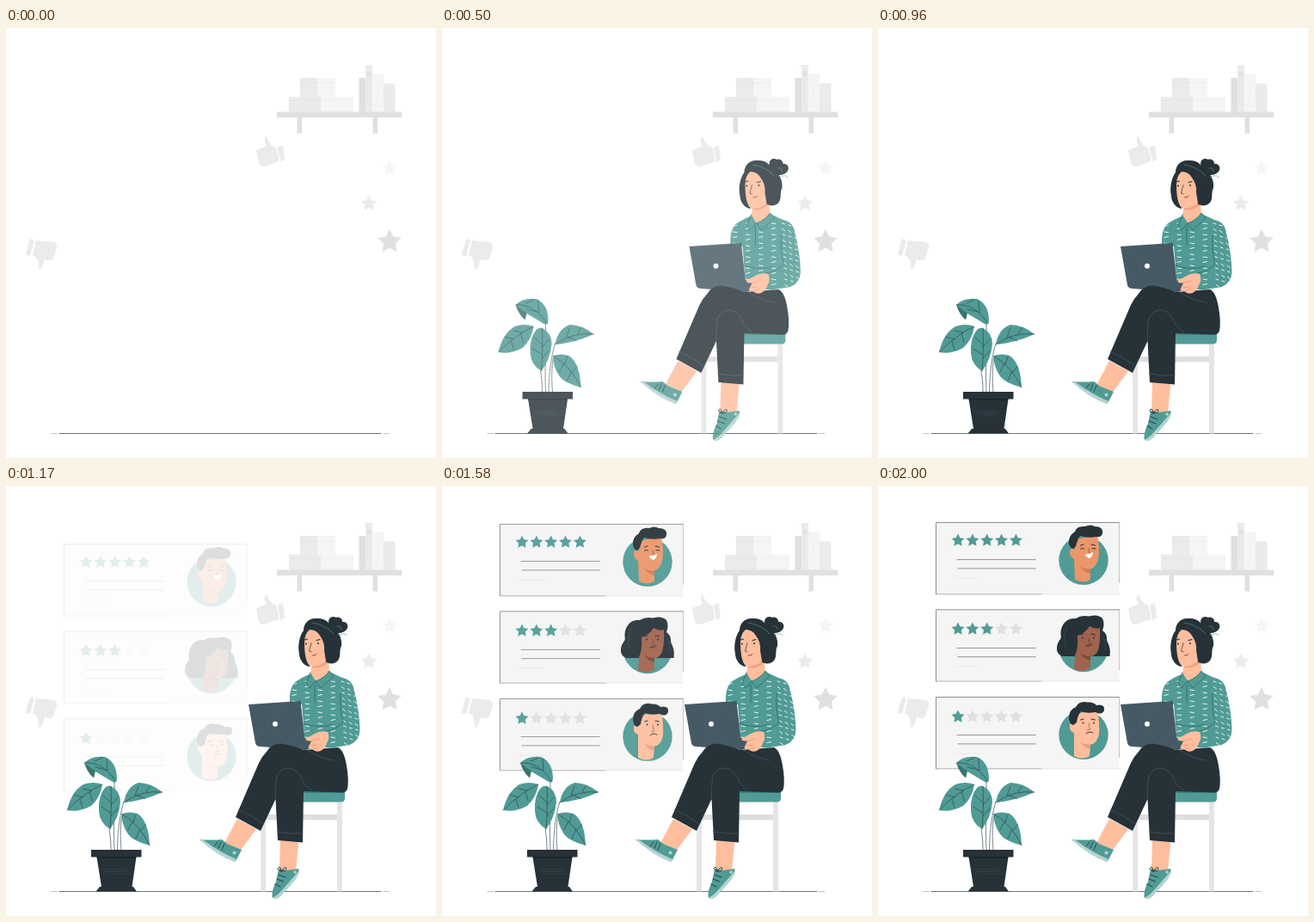
These frames come from a looping animation (500x500 px, 2040 ms). An HTML page:

```html
<!DOCTYPE html>
<html>
<head>
<meta charset="utf-8">
<style>
html, body { margin: 0; width: 100%; height: 100%; overflow: hidden; background: #fff }
svg { display: block; width: 100vmin; height: 100vmin }
</style>
</head>
<body>
<svg id="stage" viewBox="0 0 500 500"></svg>
<script>
const TEAL = '#509b95', DARK = '#263238', SLATE = '#455a64', SKIN = '#ffbe9d';
const G1 = '#e0e0e0', G2 = '#ebebeb', G3 = '#f5f5f5', PALE = '#b4d4d1';

const fill = (d, c) => `<path d="${d}" fill="${c}"/>`;
const line = (d, c = DARK, w = .7, extra = '') =>
  `<path d="${d}" fill="none" stroke="${c}" stroke-width="${w}" stroke-linecap="round" stroke-linejoin="round" ${extra}/>`;
const rect = (x, y, w, h, c) => `<rect x="${x}" y="${y}" width="${w}" height="${h}" fill="${c}"/>`;
const dot = (x, y, r, c) => `<circle cx="${x}" cy="${y}" r="${r}" fill="${c}"/>`;
const star = (x, y, r, c) => {
  let points = '';
  for (let i = 0; i < 10; i++) {
    const a = Math.PI * (i / 5 - .5), k = i % 2 ? r / 2 : r;
    points += `${(x + k * Math.cos(a)).toFixed(2)},${(y + k * Math.sin(a)).toFixed(2)} `;
  }
  return `<polygon points="${points}" fill="${c}"/>`;
};

function backdrop() {
  return rect(342, 58, 20, 22, G2) + rect(362, 58, 21, 22, G3) +
    rect(329, 80, 37, 18, G2) + rect(366, 80, 38, 18, G3) +
    line('M342 64H362M329 84H366', G1, .6) + line('M362 64H383M366 84H404', G2, .8) +
    rect(410.5, 58, 7.5, 40, G1) + rect(418, 43, 8, 55, G2) + rect(420, 50.5, 4.3, 5.5, G1) +
    rect(426, 53, 13, 45, G3) + rect(439, 64.5, 13.5, 33.5, G2) +
    line('M432.5 65V81M426 90H439', G2, .7) + line('M421 58V90', G1, .6) +
    rect(315, 97.5, 145, 6.5, G1) + rect(338.5, 104, 5.5, 18.5, G1) + rect(426.5, 104, 5.5, 18.5, G1) +
    fill('M291 142L303 137.5C300 132 300 128 303 126C305 132 308 136 312 138L315 139.5L317.5 155L300 161Q296 161 294 158ZM316 138.5L322 136L324 153L319 156Z', G2) +
    fill('M28 245L33 247L28 265L22.5 264ZM35 247L56 249Q60 252 59 256L55 268Q54 270.5 50 270L44 269Q44 276 40 281Q38 282 38 279Q38 270 34.5 266L31 265Z', G2) +
    star(446, 162.8, 9.2, G3) + star(422, 204.2, 9.5, G2) + star(446, 248.4, 14.5, G1) +
    line('M62 471.5H436', '#5f686c', .9) + line('M53 471.5H59M439 471.5H445', '#b0b4b6', .8);
}

function card(y, starY, count, lineY, face) {
  let s = rect(67.5, y, 213, 83.3, G3) +
    line(`M67.5 ${y + 83.3}V${y}H280.5`, '#70787b', .8) + line(`M280.5 ${y}V${y + 70}`, '#a9aeb0', .7) +
    line(`M67.5 ${y + 83.3}H190`, '#8d9295', .7) + line(`M190 ${y + 83.3}H280`, '#d5d7d8', .6);
  for (let i = 0; i < 5; i++) s += star(93 + i * 16.85, starY, 7.9, i < count ? TEAL : G1);
  return s + line(`M92 ${lineY}H183M93 ${lineY + 10.3}H183`, '#858b8e', .9) +
    line(`M90 ${lineY + 21.5}H118`, '#dcdedf', .6) + dot(239, y + 43.7, 28.7, TEAL) + face;
}

function features(y) {
  return line(`M235.5 ${y - 4}L239 ${y - 5}M248 ${y - 5}L252.5 ${y - 4}`, DARK, 1) +
    line(`M245 ${y}L246.5 ${y + 7}L243.5 ${y + 8}`, DARK, .5);
}

function cards() {
  const cheerful =
    fill('M229 62L255 57Q258 72 256.5 83Q254 95 247 96.5L247 109Q239 113.5 229 109L228 85Q222 82 223 75Q225 71 229 74Z', '#eb966a') +
    fill('M247 96.5Q240 97 235 93Q240 101 247 102Z', '#d17b50') +
    fill('M222 67Q221 58 229 53Q231 46 241 47Q247 44 252 47Q262 47 261 55Q260 60 254 59Q244 61 235 58Q232 62 230 70L227 73Q223 72 222 67Z', DARK) +
    features(73) + line('M235.5 73Q237.5 71.5 239.5 73M249 73Q251 71.5 253 73', DARK, 1) +
    fill('M240.5 79.5Q246 79 250 77Q249.5 83 245 84Q242 83 240.5 79.5Z', '#fff');
  const neutral =
    fill('M214 198Q207 195 208 187Q209 181 213 177Q211 167 216 160Q221 153 230 154Q236 150 245 151.5Q256 148.5 261 154Q264 160 261 168Q267 172 266 180Q271 188 269.5 198Z', DARK) +
    fill('M232 174Q241 171 246 163Q252 167 258 165Q259 185 255 193Q251 198.5 247 198L247 212Q238 217 228 213L229 197Q233 190 232 174Z', '#a0634d') +
    fill('M247 198Q240 198 235 194Q240 202 247 203Z', '#7e4938') +
    features(177) + dot(238, 176.5, 1, DARK) + dot(251, 176.5, 1, DARK) +
    line('M242 186Q246 187 249 184', DARK, .9) + line('M220 163Q215 174 218 187M262 175Q266 184 264 191', SLATE, .5);
  const unhappy =
    fill('M229 265L255 260Q258 276 257 288Q255 300 247 300.5L246 314Q238 319 228 314L228 287Q222 285 223 278Q225 274 229 277Z', SKIN) +
    fill('M247 300.5Q240 301 235 297Q240 305 247 305.5Z', '#eb9c7c') +
    fill('M222 270Q222 260 230 257Q234 249 244 251.5Q251 251 254 255Q264 253 263 261Q260 267 253 263Q242 265 236 262Q232 267 231 275L227 278Q223 277 222 270Z', DARK) +
    features(276) + dot(238.5, 275.5, 1, DARK) + dot(251, 275.5, 1, DARK) +
    line('M242 288Q246 284.5 250 287', DARK, .9);
  return card(42.5, 63.4, 5, 85.6, cheerful) + card(143.8, 166.4, 3, 188.4, neutral) +
    card(245.5, 268.3, 1, 289.6, unhappy);
}

function plant() {
  const leaves = [
    'M91 322Q100 313 115 315Q129 321 129 341Q128 346 124 344Q114 338 104 332Z',
    'M112 347Q102 343 90 347Q76 355 71 377Q84 380 99 372Q110 362 112 347Z',
    'M122 349Q133 354 133 368Q131 386 121 399Q109 392 108 378Q107 360 115 351Q118 348 122 349Z',
    'M137 368Q140 350 154 345Q168 345 182 356Q160 366 137 368Z',
    'M134.5 381Q144 378 153 381Q166 390 167 418Q148 413 142 405Q134 393 134.5 381Z'
  ];
  const veins = 'M91 322Q113 320 128 344M103 320L112 316M116 330L104 327M118 331L117 317' +
    'M112 347Q92 356 71 377M99 354L89 352M89 362L79 359M97 355L100 366M86 364L89 374' +
    'M122 349Q123 376 121 399M122 368L113 360M122 380L111 373M122 371L130 362M122 384L130 375' +
    'M137 368Q158 353 182 356M150 360L154 349M163 356L167 349M152 359L162 364' +
    'M135 381.5Q156 394 167 418M148 391L151 382M157 400L163 393M147 390L142 400M156 399L151 410';
  return line('M122 423Q122 410 120 399M126 423Q125 400 126 380V344M129.5 423Q130 390 137 367M134 423Q132 400 135 382', SLATE, .8, 'stroke-dasharray="3 1"') +
    leaves.map(d => fill(d, TEAL)).join('') + fill('M91 322L104 331.5L102 339.5Q95 334 91 322Z', '#37726d') +
    line(veins, DARK, .55) +
    fill('M99 423H157.5V431.5H151.5L146.5 466H148L152 471.5H104.5L109 466H111L105.5 431.5H99Z', DARK) +
    line('M106 432H151', '#111b20', 1) + line('M112 446H141M114 448.5H139M118 451H144', SLATE, .4);
}

function dashes() {
  let marks = '';
  for (let i = 0; i < 13; i++) {
    const y = 224 + i * 6.5;
    for (let j = 0; j < 4; j++) marks += `M${333 + j * 15} ${y + j % 2 * 3}l4.5 ${i % 2 ? -1 : .7}`;
    for (let j = 0; j < 3; j++) marks += `M${390 + j * 7 + i * .3} ${y + 3 + j * 2}l3 ${i % 2 ? 2.2 : 1}`;
  }
  return `<g clip-path="url(#shirt)">${line(marks, '#e8f3f1', 1)}</g>`;
}

function woman() {
  const shirt = 'M353 219Q341 224 335 229Q329 237 330 252L344 254L348 302L378 304.5L400 301Q411 296 411.5 284Q411 262 405 238Q403 225 391 223L376 216Z';
  const chair = rect(296, 383, 6, 88.5, '#e5e5e5') + rect(385, 366, 6, 105.5, '#e5e5e5') +
    rect(302, 382, 83, 6.3, '#dedede') +
    fill('M335 354H394V363Q394 367.5 389 367.5H335Z', TEAL) + fill('M335 354H394V357H335Z', '#3f817b');
  const feet =
    fill('M269 387L291 399L274 422L268 427L253 417Z', SKIN) +
    fill('M225 411Q240 412 251 411L258 416.5L274 423L267 436.5Q246 428 225 411Z', TEAL) +
    fill('M225 411Q227 411 230 412Q247 425 268 434L266.5 437.5Q244 429 225 411Z', PALE) +
    dot(265.5, 426.5, 2, PALE) +
    line('M246 414L242 419M250 414L247 421M254 416L251 423', DARK, .8) +
    fill('M319 411H340.5L337 448L328 453L318 446Z', SKIN) +
    fill('M317 445L326 447L340.5 445Q341 450 336 458L319 477Q313 482 309.5 478Q309 470 314 460Z', TEAL) +
    fill('M341 447Q341 452 336 458L319 477Q314 482 310 479Q316 476 321 470Z', PALE) + dot(336, 449, 1.7, PALE) +
    line('M320 448Q313 445 318 443Q320 444 320 448Q325 441 326 445Q326 448 320 448M317 452L325 455M315 457L323 460M313 463L319 466', DARK, .9);
  const torso =
    fill(shirt, TEAL) + `<clipPath id="shirt"><path d="${shirt}"/></clipPath>` + dashes() +
    fill('M356 203L375 198L376 217L361 228L354 219Z', SKIN) + fill('M356 207Q369 207 375 200L374 206Q366 213 356 211Z', '#eda083') +
    fill('M354 217L349 229L353 235L360 227ZM376 215L381 221L366 235L360 227Q371 223 376 215Z', TEAL) +
    line('M354 217L349 229L353 235L360 227Q371 223 376 215L381 221L366 235L360 227M359 231V252M389 241Q388 262 392 274Q386 283 371 285M345 276Q365 283 380 277', '#2d605c', .7);
  const laptop =
    fill('M282 254L342 250L347 294L361 293L360 303L348 307L296 303Q291 303 290 299Z', SLATE) +
    line('M342 250L347 294M348 306L360 302', '#304047', .7) + dot(313, 276.7, 3, '#fff');
  const legs =
    fill('M303 309Q308 300 319 299.5Q332 301 346 307L386 304Q393 307 396 325Q399 342 397 352Q396 356 391 356.5L346 355L345 414.5L316 412L313.5 364L296 401L267 385L294 322Q298 314 303 309Z', DARK) +
    line('M313.5 364Q313 347 315 338Q319 327 331 328Q341 331 346 345L355 354M270 376Q286 383 299 393M315 402Q330 405 345 404M352 308Q366 317 382 319', SLATE, .7);
  const hand =
    fill('M374 286Q366 284 359 288L349 293.5Q347 297 355 296.5L353 301Q349 306 356 306Q360 310 366 308Q372 304 373 299Q377 293 374 286Z', SKIN) +
    line('M355 296.5L364 294M355 302L361 301M357 306L363 304', '#d98568', .6);
  const head =
    fill('M376 162C373 155 378 150 384 153C388 151 392 156 391 158C397 157 399 163 396 167C392 172 384 172 379 169Z', DARK) +
    fill('M346 168C346 160 352 153 361 154C371 153 376 159 380 165C388 170 391 179 390 186C387 191 390 198 386 203C382 208 374 207 370 203L352 210C345 208 341 201 341 195C339 187 341 174 346 168Z', DARK) +
    fill('M347 182Q347 172 353 167Q361 167 365 174Q371 182 370 191L372 204Q361 212 353 209Q347 203 347 182Z', SKIN) +
    line('M346.5 179L350.5 178M361 179.5L365 178.5', DARK, 1.1) + dot(348.8, 183.5, 1, DARK) + dot(363, 183, 1, DARK) +
    line('M355 182.5L352.5 192L355 193', DARK, .7) + line('M356.5 197Q359 198 361 195.5', '#973f36', 1) +
    line('M356 159Q371 161 381 172M385 163Q391 162 390 167M386 173Q396 170 396 174', TEAL, .6);
  return chair + feet + torso + laptop + legs + hand + head;
}

const stage = document.getElementById('stage');
stage.innerHTML = backdrop() +
  `<g id="cards">${cards()}</g><g id="plant">${plant()}</g><g id="woman">${woman()}</g>`;
const [cardGroup, plantGroup, womanGroup] = ['cards', 'plant', 'woman'].map(id => document.getElementById(id));

// Cubic Bézier easing (.36, -.01, .5, 1.38)
function ease(x) {
  if (x <= 0) return 0;
  if (x >= 1) return 1;
  const curve = (t, a, b) => 3 * (1 - t) * (1 - t) * t * a + 3 * (1 - t) * t * t * b + t * t * t;
  let low = 0, high = 1;
  for (let i = 0; i < 24; i++) {
    const mid = (low + high) / 2;
    if (curve(mid, .36, .5) < x) low = mid; else high = mid;
  }
  return curve(low, -.01, 1.38);
}

function slide(group, p, dx, dy) {
  const k = 30 * (1 - p);
  group.setAttribute('transform', `translate(${dx * k} ${dy * k})`);
  group.setAttribute('opacity', Math.max(0, Math.min(1, p)));
}

const start = performance.now();
function draw() {
  const t = (performance.now() - start) % 2040;
  const enter = t < 30 ? 0 : ease((t + 40) / 1000);
  slide(plantGroup, enter, -1, 0);
  slide(womanGroup, enter, 1, 0);
  slide(cardGroup, t < 1160 ? 0 : ease((t - 962) / 1000), 0, 1);
  requestAnimationFrame(draw);
}
draw();
</script>
</body>
</html>
```
